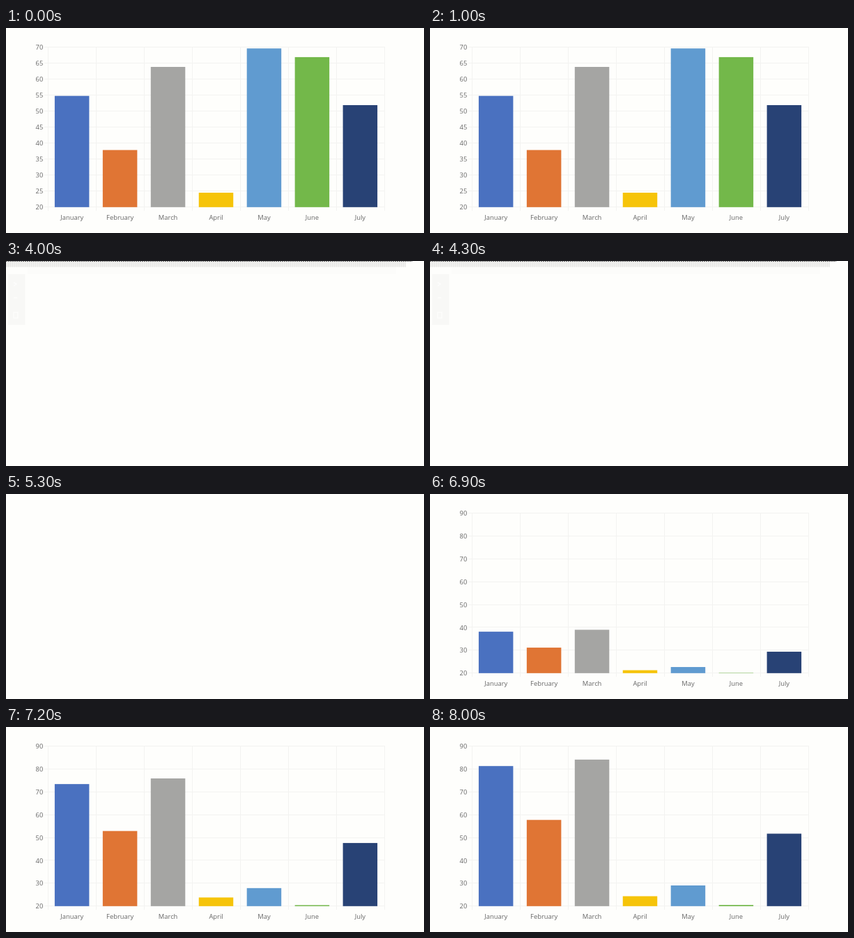
Write an HTML page that moves like this. It is 600 px wide and 295 px high and loops after 8300 ms.

```html
<!DOCTYPE html>
<html lang="en">
<head>
<meta charset="utf-8">
<title>Monthly bars</title>
<style>
  html, body { margin: 0; width: 100%; height: 100%; overflow: hidden; background: #fefefc; }
  svg { display: block; width: 600px; height: 295px; }
  text { font: 9.4px "Open Sans", "Noto Sans", sans-serif; fill: #666; }
  .grid { stroke: #f3f3f1; fill: none; }
  .end { text-anchor: end; }
  .mid { text-anchor: middle; }
  [hidden] { display: none; }
</style>
</head>
<body>
<svg viewBox="0 0 600 295">
  <g id="first"></g>
  <g id="second"></g>
  <g id="tools">
    <g id="strip">
      <path d="M31 13.5H560" stroke="#fcfcfa" stroke-width="11"/>
      <path d="M0 4.5H574" stroke="#f0f0ee" stroke-width="8"/>
      <path d="M0 4.5H574" stroke="#e8e8e6" stroke-width="8" stroke-dasharray="1 2"/>
      <path d="M0 .5H583" stroke="#666" stroke-dasharray="2 1"/>
    </g>
    <g id="panel">
      <path d="M3 19h24.5v73H3z" fill="#f8f8f6"/>
      <path d="M11 31l4 2-4 3M11 53h5M11 74h6v8h-6z" fill="none" stroke="#fdfdfc" stroke-width="1.5"/>
    </g>
  </g>
</svg>
<script>
const LOOP = 8300, BASE = 257.8, TOP = 27.3, LEFT = 60.4, STEP = 68.95;
const months = ["January", "February", "March", "April", "May", "June", "July"];
const colors = ["#4a71c0", "#e07534", "#a5a5a3", "#f6c409", "#609bd0", "#73b84a", "#284275"];
const $ = id => document.getElementById(id);

function add(parent, tag, attrs, text) {
  const el = document.createElementNS("http://www.w3.org/2000/svg", tag);
  for (const key in attrs) el.setAttribute(key, attrs[key]);
  if (text !== undefined) el.textContent = text;
  return parent.appendChild(el);
}

function buildChart(group, max, tick, tops) {
  const count = (max - 20) / tick;
  for (let i = 0; i <= count; i++) {
    const y = BASE - i * (BASE - TOP) / count;
    add(group, "path", { class: "grid", d: `M55 ${Math.floor(y) + .5}H544` });
    add(group, "text", { class: "end", x: 53.3, y: y + 3.6 }, 20 + i * tick);
  }
  for (let i = 0; i <= 7; i++) {
    add(group, "path", { class: "grid", d: `M${Math.floor(LEFT + i * STEP) + .5} 27V263` });
  }
  return months.map((name, i) => {
    add(group, "text", { class: "mid", x: 94.7 + i * STEP, y: 275.5 }, name);
    return add(group, "rect", {
      x: 69.9 + i * STEP, y: tops[i], width: 49.5, height: BASE - tops[i], fill: colors[i]
    });
  });
}

const nextTops = [56.2, 133.7, 46.9, 243.5, 228, 256.1, 153.5];
buildChart($("first"), 70, 5, [97.7, 175.6, 56, 237, 29.4, 41.9, 111]);
const bars = buildChart($("second"), 90, 10, nextTops);

const show = (id, on) => $(id).toggleAttribute("hidden", !on);

function draw() {
  // The picture advances in tenths of a second.
  const t = Math.floor(performance.now() % LOOP / 100) * 100;
  show("first", t < 2800);
  show("second", t >= 6900);
  show("tools", t >= 3900 && t < 5100);

  $("strip").setAttribute("opacity", t < 5000 ? 1 : .4);
  $("panel").setAttribute("opacity", t < 5000 ? 1 : .5);

  const p = Math.min(1, Math.max(0, .084 + (t - 6900) / 946));
  const grow = 1 - (1 - p) ** 4;
  bars.forEach((bar, i) => {
    const h = (BASE - nextTops[i]) * grow;
    bar.setAttribute("y", BASE - h);
    bar.setAttribute("height", h);
  });
  requestAnimationFrame(draw);
}
draw();
</script>
</body>
</html>
```
